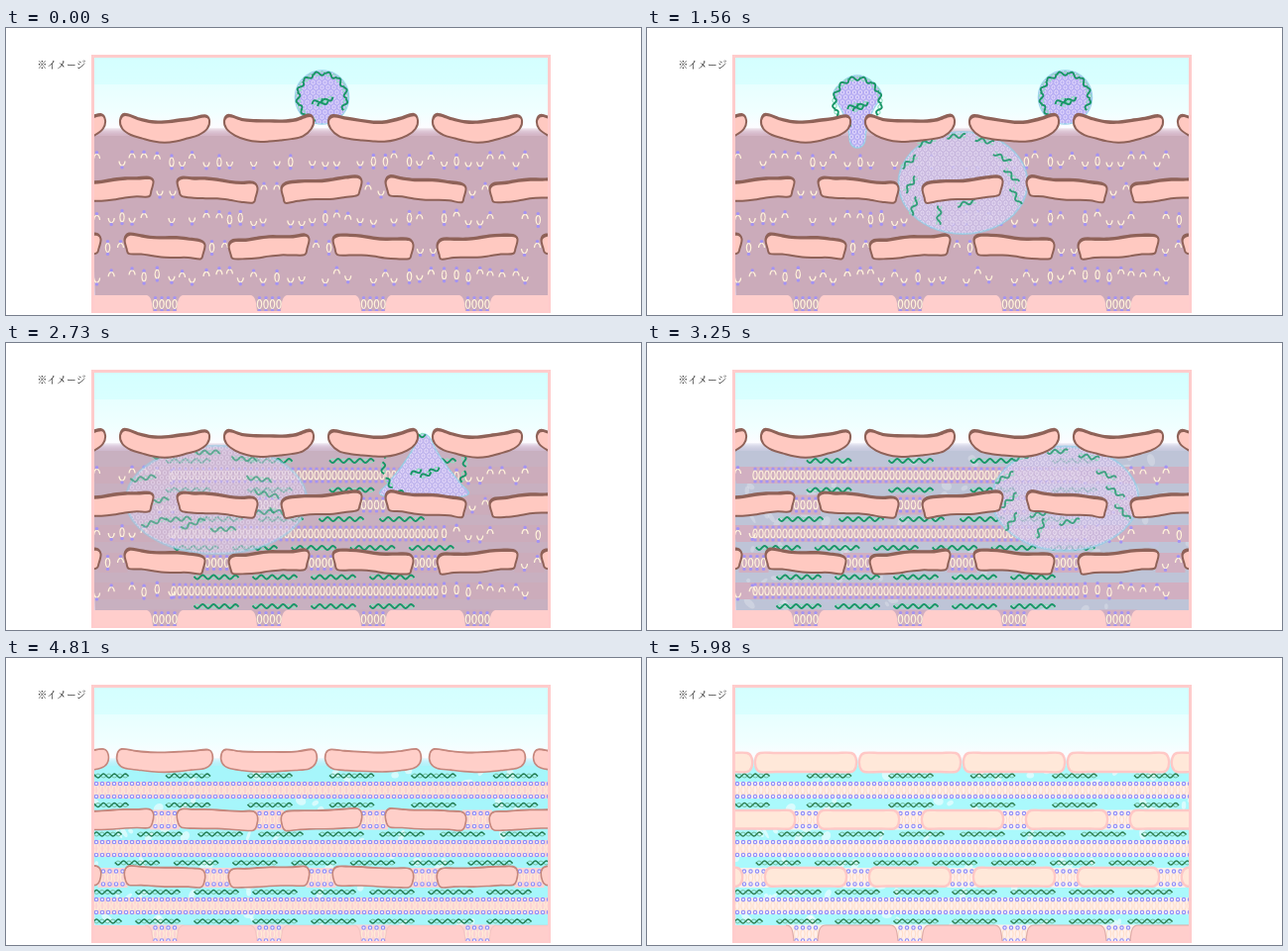
Write an HTML page with a canvas that moves like this. It is 640 px wide and 290 px high and loops after 6.11 s.

```html
<!DOCTYPE html>
<html lang="ja">
<head>
<meta charset="utf-8">
<style>
html, body { margin: 0; width: 100%; height: 100%; overflow: hidden; background: #fff; }
canvas { display: block; }
</style>
</head>
<body>
<canvas id="stage" width="640" height="290"></canvas>
<script>
const g = document.getElementById('stage').getContext('2d');
const STEP = 130, LOOP = 6110;
const L = 89, R = 546, MID = 318;

const clamp = v => Math.max(0, Math.min(1, v));
const lerp = (a, b, t) => a + (b - a) * t;
const rnd = n => { const s = Math.sin(n * 127.1 + 3.7) * 43758.5453; return s - Math.floor(s); };
const rgb = (c, a = 1) => `rgba(${c.map(Math.round).join(',')},${a})`;

// Interpolate [time, value] keys; values are numbers or arrays
function track(keys, t) {
  let i = 0;
  while (i < keys.length - 2 && t > keys[i + 1][0]) i++;
  const [t0, a] = keys[i], [t1, b] = keys[i + 1], k = clamp((t - t0) / (t1 - t0));
  return Array.isArray(a) ? a.map((v, j) => lerp(v, b[j], k)) : lerp(a, b, k);
}

const WATER = [[20, [203, 171, 186]], [29, [180, 216, 239]], [36, [166, 246, 251]], [46, [170, 249, 252]]];
const LAMELLA = [[20, [203, 171, 186]], [29, [213, 178, 198]], [36, [252, 207, 208]], [41, [252, 232, 229]], [46, [255, 239, 234]]];
const CELL = [[29, [255, 201, 193]], [37, [255, 207, 201]], [41, [255, 230, 214]], [46, [255, 232, 217]]];
const EDGE = [[29, [143, 98, 88]], [37, [197, 135, 125]], [41, [255, 192, 188]], [46, [255, 200, 198]]];
const HELIX = [[29, [24, 150, 103]], [37, [34, 125, 82]], [46, [48, 128, 82]]];
const TAIL = [[29, [255, 242, 218]], [37, [255, 236, 214]], [46, [255, 224, 205]]];
const PRESS = [[38, 0], [39, 8], [40, 17], [41, 22], [42, 8], [43, -9], [44, -5], [45, 3], [46, 0]];

const ROWS = [
  { cx: 160, hw: [45, 50.5], top: [86, 96], h: [18, 19], sag: [8, 11], tilt: 0 },
  { cx: 213, hw: [40.5, 40.5], top: [153, 154], h: [20, 18.5], sag: [0, 0], tilt: 3.5 },
  { cx: 160, hw: [40.5, 40.5], top: [211, 212], h: [20, 18.5], sag: [0, 0], tilt: 3 }
];
const SHEETS = [133.5, 192.5, 250.5];
// y, first x, spacing
const STRANDS = [[119, 101, 82.5], [148.5, 101, 82.5], [178, 94, 61], [207, 73, 59.3], [236.5, 94, 59], [266, 94, 59]];

// Blob outlines: top, bottom, then half widths at seven cosine-spaced heights
const round = (top, bottom, r) => [top, bottom, 0, r * .5, r * .866, r, r * .866, r * .5, 0];
const BLOB = [
  [-3, round(-7, 47, 27)], [0, round(43, 97, 27)], [3, round(43, 97, 27)],
  [6, [48, 121, 0, 13, 24, 15, 9, 7, 0]],
  [8, [60, 138, 0, 9, 14, 8, 14, 20, 0]],
  [9, [92, 158, 0, 6, 12, 23, 36, 43, 0]],
  [12, round(105, 208, 65)], [15, round(104, 213, 91)], [19, round(104, 224, 125)]
];
const BLOB_ALPHA = [[9, 1], [12, .85], [15, .6], [19, 0]];
const DROPS = [{ x: 318.5, start: 0 }, { x: 212, start: 6 }, { x: 421.5, start: 12 }];

let frame = 0, press = 0;

function sink(x, y) {
  const d = Math.min(1, Math.abs(x - MID) / 215);
  return press * (1 + Math.cos(Math.PI * d)) / 2 * clamp(1 - (y - 96) / 220);
}
const warp = ([x, y]) => [x, y + sink(x, y)];

function smoothPath(pts) {
  const n = pts.length, at = i => pts[(i + n) % n];
  g.beginPath();
  g.moveTo(...pts[0]);
  for (let i = 0; i < n; i++) {
    const [a, b, c, d] = [at(i - 1), at(i), at(i + 1), at(i + 2)];
    g.bezierCurveTo(b[0] + (c[0] - a[0]) / 6, b[1] + (c[1] - a[1]) / 6,
      c[0] - (d[0] - b[0]) / 6, c[1] - (d[1] - b[1]) / 6, c[0], c[1]);
  }
  g.closePath();
}

function band(y0, y1, color) {
  g.beginPath();
  for (let x = L - 3; x <= R + 6; x += 6) g.lineTo(...warp([x, y0]));
  for (let x = R + 6; x >= L - 3; x -= 6) g.lineTo(...warp([x, y1]));
  g.fillStyle = color;
  g.fill();
}

function sky() {
  const s = g.createLinearGradient(0, 30, 0, 108);
  s.addColorStop(0, '#d4ffff');
  s.addColorStop(.34, '#d9ffff');
  s.addColorStop(.35, '#e7ffff');
  s.addColorStop(.7, '#f0ffff');
  s.addColorStop(.9, '#fcfcff');
  s.addColorStop(1, '#eee4fa');
  g.fillStyle = s;
  g.fillRect(L, 30, R - L, 256);
}

function helix(x, y, len, angle, alpha = 1) {
  const dark = track(HELIX, frame);
  g.save();
  g.translate(x, y);
  g.rotate(angle);
  g.globalAlpha *= alpha;
  const strand = (phase, color, width) => {
    g.beginPath();
    for (let s = -len / 2; s <= len / 2; s += 1) g.lineTo(s, Math.sin(s * .57 + phase) * 2);
    g.strokeStyle = color;
    g.lineWidth = width;
    g.stroke();
  };
  strand(Math.PI, frame < 34 ? '#8fe0c0' : '#79c4a8', 1.1);
  strand(0, rgb(dark), frame < 34 ? 1.9 : 1.4);
  g.restore();
}

// Lipid: one head with two tails; dir -1 points the head up
function lipid(x, y, dir, spread) {
  const [px, py] = warp([x, y]);
  g.strokeStyle = rgb(track(TAIL, frame));
  g.lineWidth = 1.2;
  g.beginPath();
  for (const s of [-1, 1]) {
    g.moveTo(px, py + dir * 5);
    g.quadraticCurveTo(px + s * spread, py + dir * 3.5, px + s * spread, py);
  }
  g.stroke();
  g.beginPath();
  g.arc(px, py + dir * 6.4, 1.7, 0, 7);
  if (frame < 34) {
    g.fillStyle = '#a493f3';
    g.fill();
  } else {
    g.fillStyle = '#f4f2ff';
    g.fill();
    g.strokeStyle = '#8d8cf8';
    g.lineWidth = 1.1;
    g.stroke();
  }
}

function pair(x, y) {
  lipid(x, y, -1, 2.2);
  lipid(x, y, 1, 2.2);
}

function stray(x, y, seed) {
  const k = rnd(seed);
  if (k < .38) lipid(x, y, -1, 3);
  else if (k < .76) lipid(x, y + 1, 1, 3);
  else pair(x, y);
}

function ordered(x) {
  return DROPS.some((d, i) => {
    const reach = clamp((frame - d.start - 12) / 9) * (i ? 138 : 115);
    return reach > 0 && Math.abs(x - d.x) < reach;
  });
}

function tissue() {
  const water = track(WATER, frame), sheet = rgb(track(LAMELLA, frame));
  for (let i = 0; i < 8; i++) band(101 + i, 110, rgb(water, .2));
  band(109, 290, rgb(water));

  const wet = clamp((frame - 22) / 7);
  if (wet) for (let i = 0; i < 75; i++) {
    const y = STRANDS[i % 6][0] + (rnd(i) - .5) * 12;
    const x = L + (rnd(i + 200) * 470 + frame * (rnd(i + 90) - .5) * 3 + 470) % 470;
    const [px, py] = warp([x, y]);
    g.fillStyle = i % 5 ? `rgba(255,255,255,${wet * .55})` : `rgba(200,190,250,${wet * .4 * clamp((38 - frame) / 8)})`;
    g.beginPath();
    g.ellipse(px, py, 2 + rnd(i + 50) * 5, 1.5 + rnd(i + 70) * 3, rnd(i) * 3, 0, 7);
    g.fill();
  }

  SHEETS.forEach((y, r) => {
    if (frame > 20) band(y - 8.5, y + 8.5, sheet);
    for (let i = 0; i < 78; i++) {
      const x = 91 + i * 6;
      if (ordered(x)) pair(x, y);
      else if (i % 2 === 0 && rnd(i * 3 + r * 57) > .14) stray(x + rnd(i) * 4, y + (rnd(i + r * 31) - .5) * 4, i + r * 91);
    }
  });

  [[160, 163.5], [107.5, 222]].forEach(([x0, y], r) => {
    for (let k = 0; k < 5; k++) {
      const cx = x0 + k * 105, done = ordered(cx);
      if (frame > 20) {
        const [px, py] = warp([cx, y]);
        g.fillStyle = sheet;
        g.fillRect(px - 15, py - 10, 30, 20);
      }
      for (let i = 0; i < 4; i++) {
        const x = cx - 9.5 + i * 6.5;
        if (done) pair(x, y);
        else if (i % 2) stray(x - 2, y, i + k * 7 + r * 40);
      }
    }
  });

  STRANDS.forEach(([y, x0, gap]) => {
    for (let x = x0; x < R + 24; x += gap) {
      if (!ordered(x)) continue;
      const [px, py] = warp([x, y]);
      helix(px, py, 45, Math.atan2(sink(x + 8, y) - sink(x - 8, y), 16));
    }
  });
}

function blob({ x, start }) {
  const p = frame - start;
  if (p < -3 || p >= 19) return;
  const [top, bottom, ...half] = track(BLOB, p);
  const cy = (top + bottom) / 2, ry = (bottom - top) / 2;
  const ys = half.map((_, i) => cy - ry * Math.cos(Math.PI * i / 6));
  const right = half.map((w, i) => [x + w, ys[i]]);
  const left = half.map((w, i) => [x - w, ys[i]]).slice(1, 6).reverse();
  const widest = Math.max(...half);
  const spread = clamp((p - 9) / 6);

  g.save();
  g.globalAlpha = track(BLOB_ALPHA, p);
  smoothPath([...right, ...left]);
  g.fillStyle = rgb(track([[6, [183, 174, 243]], [12, [201, 188, 230]], [15, [208, 190, 224]]], p));
  g.fill();
  g.strokeStyle = rgb([146, 206, 232], .9);
  g.lineWidth = lerp(1.5, 2.5, spread);
  g.stroke();

  g.save();
  g.clip();
  g.strokeStyle = 'rgba(250,240,255,.65)';
  g.lineWidth = 1;
  g.beginPath();
  for (let j = 0, y = top + 2; y < bottom; y += 5, j++)
    for (let px = x - widest + (j % 2) * 3; px < x + widest; px += 6) {
      g.moveTo(px + 1.6, y);
      g.ellipse(px, y, 1.6, 2, 0, 0, 7);
    }
  g.stroke();
  g.restore();

  // Strands wrap the ball, then drift apart and level out
  const headY = p < 9 ? Math.min(top + 27, top + ry) : cy;
  const rx = p < 9 ? Math.min(widest, 25) : widest;
  const rr = p < 9 ? Math.min(25, ry) : ry;
  for (let i = 0; i < 13; i++) {
    const a = i < 10 ? 2.1 + i * .5 : 3 + i;
    const depth = i < 10 ? lerp(.96, .5 + rnd(i + 8) * .5, spread) : .25 + spread * .3;
    const turn = i < 10 ? a + Math.PI / 2 : -.4;
    const tilt = Math.atan2(Math.sin(turn), Math.cos(turn)) % Math.PI;
    helix(x + Math.cos(a) * rx * depth, headY + Math.sin(a) * rr * depth,
      lerp(12, 26, spread), tilt * (1 - spread * .85));
  }
  g.restore();
}

function cell(row, k, m) {
  const cx = row.cx + k * 105;
  const [hw, top, h] = [row.hw, row.top, row.h].map(v => lerp(v[0], v[1], m));
  const loose = 1 - m;
  const tilt = row.tilt * (k % 2 ? -1 : 1) * loose;
  const [sagT, sagB] = row.sag.map(v => v * loose);
  const corner = 1 - 4.5 / hw;
  const low = row.tilt ? corner : lerp(corner, .76, loose);
  const wob = u => Math.sin(u * 5 + k * 2 + row.cx) * .8 * loose;
  const upper = u => [cx + u * hw, top + sagT * (1 - u * u) + tilt * u + wob(u)];
  const lower = u => [cx + u * hw, top + h + sagB * (1 - u * u) + tilt * u + wob(u + 1)];
  const side = (s, v) => [cx + s * hw * (1 - (v > .5 ? .05 * loose : 0)), top + h * v + sagT * .3 + tilt * s];
  const us = [-1, -.66, -.33, 0, .33, .66, 1];
  const pts = [...us.map(u => upper(u * corner)), side(1, .26), side(1, .74),
    ...us.map(u => lower(-u * low)), side(-1, .74), side(-1, .26)].map(warp);

  const edge = rgb(track(EDGE, frame)), fill = rgb(track(CELL, frame));
  g.save();
  smoothPath(pts);
  g.fillStyle = edge;
  g.fill();
  g.save();
  g.clip();
  smoothPath(pts.map(([x, y]) => [x + .7 * loose, y + 2.4 * loose]));
  g.fillStyle = fill;
  g.fill();
  g.restore();
  smoothPath(pts);
  g.strokeStyle = edge;
  g.lineWidth = track([[29, 2], [37, 1.6], [41, 2.4]], frame);
  g.stroke();
  g.restore();
}

function base() {
  const late = clamp((frame - 35) / 6);
  const line = rgb([222, 172, 168], late);
  band(270, 292, rgb([255, 206, 204]));
  for (let k = 0; k < 4; k++) {
    const cx = 160 + k * 105;
    const at = (x, y) => warp([cx + x, y]);
    g.beginPath();
    g.moveTo(...at(-20, 269.5));
    g.bezierCurveTo(...at(-14, 270), ...at(-13, 275), ...at(-12, 286));
    g.lineTo(...at(12, 286));
    g.bezierCurveTo(...at(13, 275), ...at(14, 270), ...at(20, 269.5));
    g.closePath();
    g.fillStyle = rgb(track(LAMELLA, frame));
    g.fill();
    for (let i = 0; i < 4; i++) pair(cx - 9.5 + i * 6.5, 279);
    g.beginPath();
    g.moveTo(...at(-12, 286));
    g.bezierCurveTo(...at(-13, 275), ...at(-14, 270), ...at(-20, 270));
    g.moveTo(...at(12, 286));
    g.bezierCurveTo(...at(13, 275), ...at(14, 270), ...at(20, 270));
    for (let x = 20; x <= 85; x += 13) g.lineTo(...at(x, 270));
    g.strokeStyle = line;
    g.lineWidth = 1.2;
    g.stroke();
  }
}

function draw(ms) {
  frame = Math.floor((ms % LOOP) / STEP);
  press = track(PRESS, frame);
  const plump = clamp((frame - 32) / 9);

  g.fillStyle = '#fff';
  g.fillRect(0, 0, 640, 290);
  g.fillStyle = '#222';
  g.font = '9.8px "Noto Serif CJK JP", "Noto Sans CJK JP", "Noto Sans CJK", serif';
  g.fillText('※イメージ', 31.5, 41);

  g.fillStyle = '#ffcccc';
  g.fillRect(86, 27, 463, 261);
  g.save();
  g.beginPath();
  g.rect(L, 30, R - L, 256);
  g.clip();
  sky();
  tissue();
  DROPS.forEach(blob);
  for (const row of ROWS) for (let k = -2; k < 5; k++) cell(row, k, plump);
  base();
  g.restore();
}

function tick() {
  draw(performance.now());
  requestAnimationFrame(tick);
}
tick();
</script>
</body>
</html>
```
